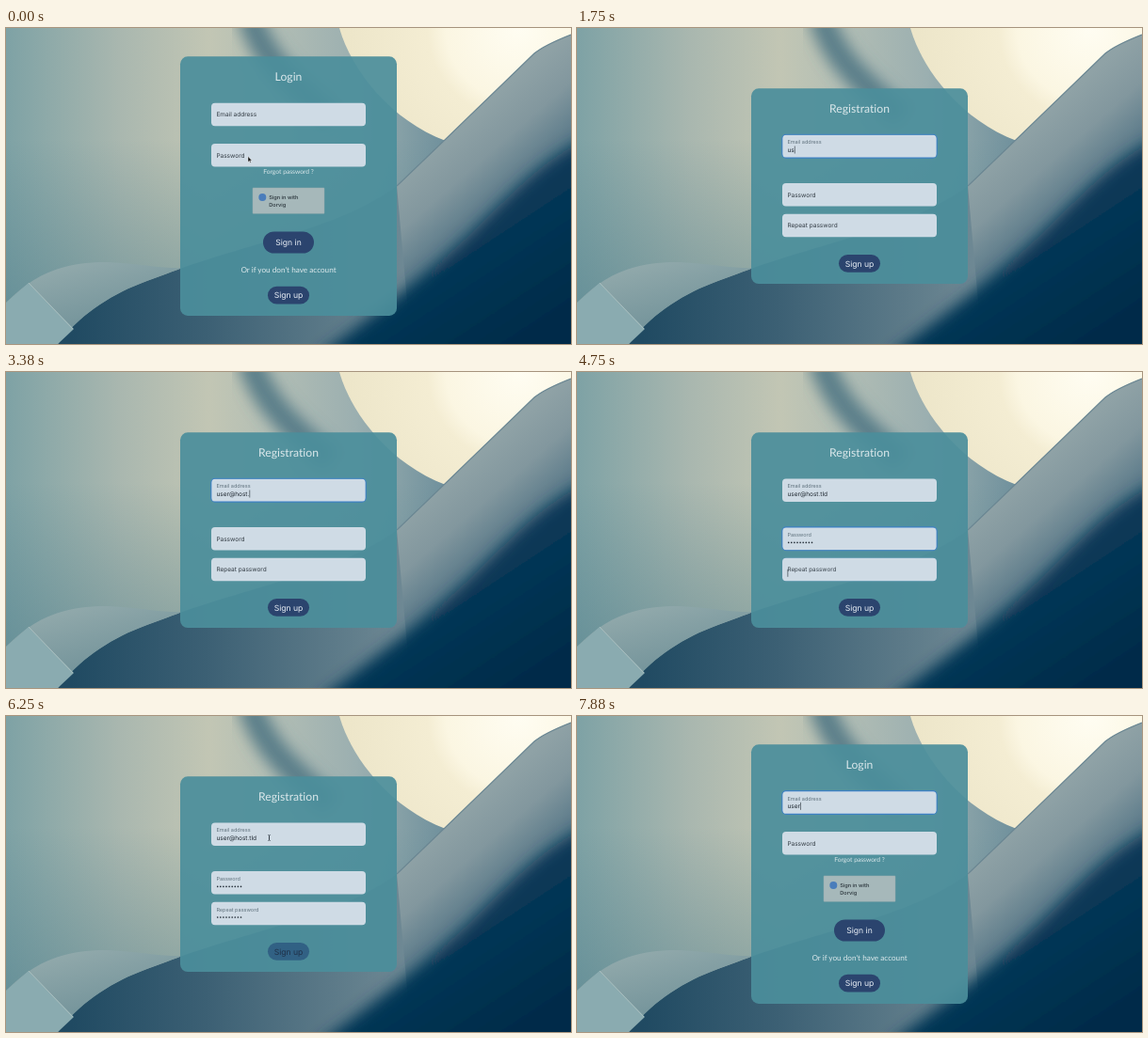
These frames come from a looping animation (600x336 px, 8000 ms). An HTML page:

```html
<!DOCTYPE html>
<html lang="en">
<head>
<meta charset="utf-8">
<title>Login and registration</title>
<style>
html, body { margin: 0; width: 100%; height: 100%; overflow: hidden; }
svg { display: block; width: 600px; height: 336px; }
text { font-family: Inter, sans-serif; text-rendering: geometricPrecision; font-variant-ligatures: none; }
.lato { font-family: Lato, sans-serif; fill: #dbe8eb; text-anchor: middle; }
.mid { text-anchor: middle; }
</style>
</head>
<body>
<svg viewBox="0 0 600 336">
  <defs>
    <linearGradient id="wall">
      <stop offset="0" stop-color="#7ea2a5"/><stop offset=".2" stop-color="#a9b7af"/>
      <stop offset=".36" stop-color="#c2c6b4"/><stop offset=".46" stop-color="#b4bfb5"/>
      <stop offset=".62" stop-color="#9bafb0"/><stop offset=".78" stop-color="#6f909c"/>
    </linearGradient>
    <linearGradient id="shade" x2="0" y2="1">
      <stop offset=".35" stop-color="#4f7f8c" stop-opacity="0"/><stop offset="1" stop-color="#4f7f8c" stop-opacity=".6"/>
    </linearGradient>
    <radialGradient id="sun" gradientUnits="userSpaceOnUse" cx="545" cy="0" r="195">
      <stop offset="0" stop-color="#fffdf2"/><stop offset=".4" stop-color="#fbf6e2"/>
      <stop offset=".5" stop-color="#f4edd3"/><stop offset="1" stop-color="#ece5c8"/>
    </radialGradient>
    <linearGradient id="slope" gradientUnits="userSpaceOnUse" x1="500" y1="88" x2="570" y2="168">
      <stop offset="0" stop-color="#8fa2a6"/><stop offset=".4" stop-color="#82979e"/><stop offset="1" stop-color="#4a6e81"/>
    </linearGradient>
    <linearGradient id="deep" gradientUnits="userSpaceOnUse" x1="480" y1="200" x2="570" y2="336">
      <stop offset="0" stop-color="#0a3b5a"/><stop offset=".5" stop-color="#033251"/><stop offset="1" stop-color="#032a48"/>
    </linearGradient>
    <linearGradient id="hill" gradientUnits="userSpaceOnUse" x1="70" y1="0" x2="430" y2="0">
      <stop offset="0" stop-color="#204a62"/><stop offset=".4" stop-color="#3c6074"/><stop offset="1" stop-color="#708a95"/>
    </linearGradient>
    <linearGradient id="dome" x2=".5" y2="1">
      <stop offset="0" stop-color="#98aeaf"/><stop offset="1" stop-color="#6c8e96"/>
    </linearGradient>
    <filter id="soft" x="-20%" y="-20%" width="140%" height="140%"><feGaussianBlur stdDeviation="8"/></filter>
  </defs>
  <rect width="600" height="336" fill="url(#wall)"/>
  <rect width="600" height="336" fill="url(#shade)"/>
  <path d="M258 -15C270 25 292 50 345 95" fill="none" stroke="#4c7482" stroke-width="27" stroke-opacity=".85" filter="url(#soft)"/>
  <path d="M354 0C367 46 410 99 467 120L580 30L600 8V0Z" fill="url(#sun)"/>
  <path d="M600 7Q572 18 561 27L466 119L415 168L330 336H600Z" fill="url(#slope)"/>
  <path d="M600 7Q572 18 561 27L466 119L415 168" fill="none" stroke="#6b8793" stroke-width="1.2"/>
  <path d="M55 336C75 308 110 284 142 272C165 263 180 258 190 254C300 218 360 208 415 168L430 336Z" fill="url(#hill)"/>
  <path d="M640 108C565 135 530 188 470 240C430 275 390 305 330 350L640 370Z" fill="url(#deep)" filter="url(#soft)"/>
  <path d="M0 292C30 262 60 248 110 249C150 252 170 256 187 255C180 258 165 263 142 272C110 284 75 308 55 336H0Z" fill="url(#dome)"/>
  <path d="M0 292L24 271L72 320L55 336H0Z" fill="#8aabb0"/>
  <path d="M24 271L71 320" stroke="#b3c4c3" stroke-width=".8"/>
  <g id="ui"></g>
</svg>
<script>
const LOOP = 8000, EMAIL = 'user@host.tld', BRAND = 'Dorvig';
const ui = document.getElementById('ui');
const clamp = x => Math.max(0, Math.min(1, x));
const ramp = (t, start, length) => clamp((t - start) / length);
const mix = (a, b, k) => a + (b - a) * k;
const blend = (a, b, k) => `rgb(${a.map((v, i) => Math.round(mix(v, b[i], k)))})`;
const typed = (t, start, pace, max) => Math.max(0, Math.min(max, Math.floor((t - start) / pace) + 1));

const box = (x, y, w, h, r, fill, extra = '') =>
  `<rect x="${x}" y="${y}" width="${w}" height="${h}" rx="${r}" fill="${fill}" ${extra}/>`;
const label = (x, y, size, str, attrs = '') =>
  `<text x="${x}" y="${y}" font-size="${size}" ${attrs}>${str}</text>`;
const card = (y, h, title) =>
  box(185, y, 230, h, 8, '#4b8f9c', 'fill-opacity=".92"') + label(300, y + 25.7, 12.2, title, 'class="lato"');

const measure = document.createElement('canvas').getContext('2d');
function textWidth(str) {
  measure.font = '65px Inter, sans-serif';
  return measure.measureText(str).width / 10;
}

// A field with a floating label, focused from `on` to `off`
function field(t, y, name, { on = Infinity, off = Infinity, text = '', dots = 0 } = {}) {
  const up = ramp(t, on, 110);
  const ring = ramp(t, on, 130) * (1 - ramp(t, off + 30, 130));
  const size = mix(6.5, 5.5, up);
  let out = box(218, y, 164, 24.4, 4, '#cfdbe5');
  if (ring > 0) {
    out += box(217.8, y - .2, 164.4, 24.8, 4.2, 'none', `stroke="#3d80c4" stroke-opacity="${ring}" stroke-width="1.1"`);
  }
  out += label(223.4, y + mix(14.5, 9.7, up), size, name, `fill="${blend([50, 59, 67], [97, 115, 126], up)}"`);
  out += label(223.4, y + 18.2, 6.5, text, 'fill="#1f2831"');
  for (let i = 0; i < dots; i++) out += `<circle cx="${224.7 + i * 3.1}" cy="${y + 16.2}" r=".85" fill="#26303a"/>`;
  if (t >= on && t < off) {
    const x = 223.6 + (dots ? dots * 3.1 : textWidth(text));
    out += box(x, y + 12, .6, 8, 0, '#222b33');
  }
  return out;
}

function signUp(y, hot) {
  return box(278, y, 44, 18.8, 9.4, blend([43, 68, 110], [49, 97, 132], hot))
    + label(300, y + 12.6, 8.6, 'Sign up', `class="mid" fill="${blend([232, 238, 245], [31, 49, 73], hot)}"`);
}

function login(t, email, hot) {
  return card(30.3, 275.6, 'Login') + field(t, 79.8, 'Email address', email) + field(t, 123, 'Password')
    + label(300, 154.8, 6.7, 'Forgot password ?', 'class="lato"')
    + box(262, 170, 76, 27.3, .5, '#a6b8ba', 'stroke="#94a9ac" stroke-width=".5"')
    + '<circle cx="272.3" cy="180" r="4" fill="#4a7dbb"/>'
    + label(279.2, 181.7, 5.6, 'Sign in with', 'font-weight="600" fill="#384349"')
    + label(279.2, 190.3, 5.6, BRAND, 'font-weight="600" fill="#384349"')
    + box(273, 216.4, 54, 23.2, 11.6, '#2b446e')
    + label(300, 231.4, 8.6, 'Sign in', 'class="mid" fill="#e8eef5"')
    + label(300, 260, 8.2, "Or if you don't have account", 'class="lato"')
    + signUp(274.8, hot);
}

function registration(t) {
  const letters = t < 2000 ? typed(t, 1600, 130, 2) : 2 + typed(t, 2000, 190, 11);
  return card(64.3, 207.8, 'Registration')
    + field(t, 113.5, 'Email address', { on: 1490, off: 3980, text: EMAIL.slice(0, letters) })
    + field(t, 165.1, 'Password', { on: 3980, off: 4735, dots: typed(t, 4050, 55, 9) })
    + field(t, 197.8, 'Repeat password', { on: 4735, off: 5630, dots: typed(t, 4900, 75, 9) })
    + signUp(240.9, ramp(t, 5630, 120));
}

const cursors = {
  arrow: '<path d="M0 0V6L1.4 4.7L2.4 6.8L3.3 6.4L2.4 4.4H4.1Z" fill="#111" stroke="#fff" stroke-width=".4"/>',
  hand: '<path d="M-.5 -2Q.2 -2.8 .8 -2V.3L2.9 .8Q3.4 3 2.4 5H-.6L-2.3 2Q-2 1-.5 2Z" fill="#fff" stroke="#222" stroke-width=".6"/>',
  beam: '<path d="M-1.2 -3Q0 -3 0 -2V2Q0 3 -1.2 3M1.2 -3Q0 -3 0 -2V2Q0 3 1.2 3" fill="none" stroke="#26303a" stroke-width=".7"/>'
};

function pointer(t) {
  const glide = (start, length, x0, y0, x1, y1) => {
    const k = ramp(t, start, length), e = k * k * (3 - 2 * k);
    return [mix(x0, x1, e), mix(y0, y1, e)];
  };
  let at, kind = 'arrow';
  if (t < 1250) {
    at = glide(130, 870, 257, 136.5, 299.5, 277);
    if (at[1] > 274.8 || at[1] > 216 && at[1] < 240 && at[0] > 273) kind = 'hand';
  } else if (t < 1600) {
    at = glide(1250, 220, 299.5, 277, 279.5, 129.5);
    if (t > 1450) kind = 'beam';
  } else if (t > 6100 && t < 7300) {
    at = glide(6650, 300, 279.5, 129.5, 279.5, 95);
    if (t < 6500 || t > 7000) kind = 'beam';
  } else return '';
  return `<g transform="translate(${at})">${cursors[kind]}</g>`;
}

function draw(t) {
  let page;
  if (t < 1250) page = login(t, {}, ramp(t, 960, 150));
  else if (t < 6500) page = registration(t);
  else page = login(t, { on: 7130, text: EMAIL.slice(0, typed(t, 7300, 170, 4)) }, 0);
  ui.innerHTML = page + pointer(t);
}

function tick() {
  draw(performance.now() % LOOP);
  requestAnimationFrame(tick);
}
tick();
</script>
</body>
</html>
```
